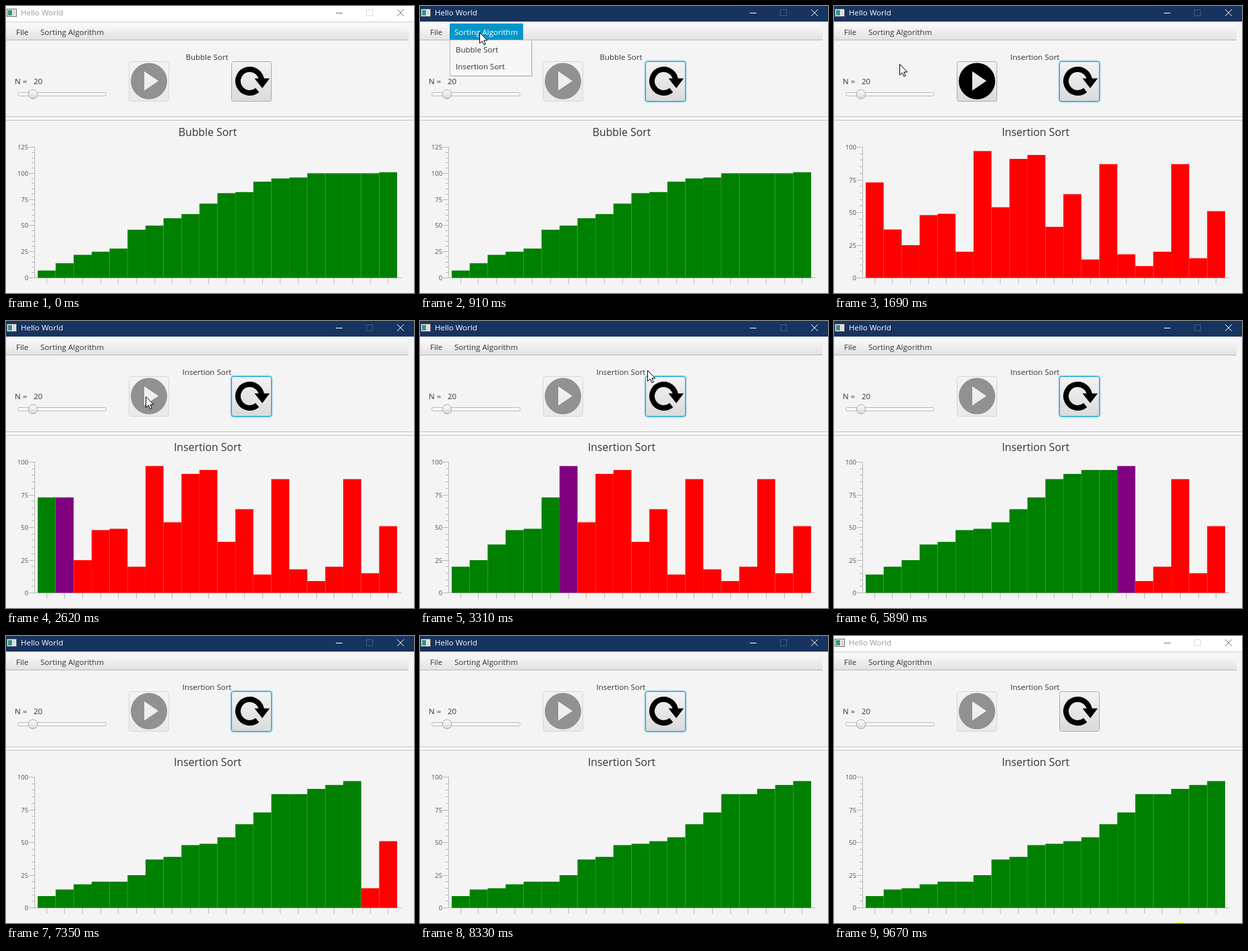
Recreate the animation shown at these times as an HTML page. Size 605 by 426 pixels, loop 9.77 s.

```html
<!DOCTYPE html>
<html lang="en">
<head>
<meta charset="utf-8">
<title>Sorting</title>
<style>
  html, body { margin: 0; width: 100%; height: 100%; overflow: hidden; background: #f4f4f4; }
  svg { display: block; }
  text { font: 11.5px "Open Sans", "Noto Sans", sans-serif; fill: #333; white-space: pre; }
  .mid { text-anchor: middle; }
  .title { font-size: 15.8px; }
  .tick { font-size: 9.4px; fill: #4c4c4c; text-anchor: end; }
  .line { stroke: #b9b9b9; shape-rendering: crispEdges; }
</style>
</head>
<body>
<svg width="605" height="426" viewBox="0 0 605 426">
  <defs>
    <linearGradient id="barFill" x2="0" y2="1">
      <stop stop-color="#fafafa"/><stop offset="1" stop-color="#e2e2e2"/>
    </linearGradient>
    <linearGradient id="btnFill" x2="0" y2="1">
      <stop stop-color="#f3f3f3"/><stop offset="1" stop-color="#dadada"/>
    </linearGradient>
    <linearGradient id="thumbFill" x2="0" y2="1">
      <stop stop-color="#fdfdfd"/><stop offset="1" stop-color="#d6d6d6"/>
    </linearGradient>
  </defs>
  <rect width="605" height="426" fill="#f4f4f4"/>

  <!-- title bar -->
  <rect id="caption" width="605" height="23"/>
  <path d="M0 23.5H605" class="line" style="stroke:#d4d4d4"/>
  <rect x="1.5" y="4.5" width="14" height="11" fill="#f4f4f4" stroke="#666"/>
  <rect x="3" y="6" width="6" height="8" fill="#3f8f83"/>
  <rect x="10" y="6" width="4" height="8" fill="#d5d9dc"/>
  <text id="name" x="22" y="14">Hello World</text>
  <g fill="none">
    <path id="minBtn" d="M489 10.5H499"/>
    <rect id="maxBtn" x="534.5" y="5.5" width="9" height="9"/>
    <path id="closeBtn" d="M580 5L590 15M590 5L580 15"/>
  </g>

  <!-- menu bar -->
  <rect y="26" width="597" height="24" fill="url(#barFill)"/>
  <path d="M0 50.5H597" class="line"/>
  <rect id="menuHot" x="44" y="26" width="109" height="24" fill="#0096c9"/>
  <text x="15" y="43">File</text>
  <text id="menuName" x="51" y="43">Sorting Algorithm</text>

  <!-- controls -->
  <text x="13" y="116">N =  </text>
  <text x="41" y="116">20</text>
  <rect x="17.5" y="128.5" width="131" height="5" rx="2.5" fill="#fafafa" stroke="#b9b9b9"/>
  <circle cx="40" cy="131" r="6.8" fill="url(#thumbFill)" stroke="#a9a9a9"/>
  <text id="label" class="mid" x="298" y="80"></text>
  <g id="play">
    <rect x="182.5" y="82.5" width="59" height="59" rx="3" fill="url(#btnFill)" stroke="#acacac"/>
    <path fill-rule="evenodd" d="M185 111.5a27 27 0 1 1 54 0a27 27 0 1 1 -54 0M205 97V125.5L226 111.3Z"/>
  </g>
  <rect id="glow" x="333.5" y="81.5" width="61" height="61" rx="4" fill="none" stroke="#039ed3" stroke-opacity=".35" stroke-width="2"/>
  <rect id="reset" x="334.5" y="82.5" width="59" height="59" rx="3" fill="url(#btnFill)"/>
  <path d="M379 111.5A17.5 17.5 0 1 0 372.7 124.9" fill="none" stroke="#000" stroke-width="8"/>
  <path d="M368.5 107.5H391L380 122Z"/>

  <!-- divider -->
  <rect y="164" width="605" height="6" fill="#fbfbfb"/>
  <path d="M0 164.5H605M0 169.5H605" class="line" style="stroke:#c2c2c2"/>

  <!-- chart -->
  <text id="title" class="mid title" x="299" y="193"></text>
  <g id="axes"></g>
  <g id="bars"></g>

  <g id="popup">
    <rect x="46" y="53" width="121" height="52" fill="#000" opacity=".12"/>
    <rect x="44.5" y="50.5" width="121" height="53" fill="#f7f7f7" stroke="#b9b9b9"/>
    <rect id="itemHot" x="45" width="120" height="25" fill="#0096c9"/>
    <text class="item" x="53" y="69">Bubble Sort</text>
    <text class="item" x="53" y="94">Insertion Sort</text>
  </g>
  <circle id="click" cx="513" cy="436.5" r="12.5" fill="#ffff28" opacity=".8"/>
  <path id="cursor" d="M.5 .5V16.5L4.2 13L6.7 18.6L9.2 17.5L6.8 12H11.8Z" fill="#fff" stroke="#000"/>
</svg>
<script>
const LOOP = 9770, N = 20, LEFT = 47, STEP = 26.65, BASE = 403.5, HEIGHT = 194;
const MENU_OPEN = 850, PICK = 1620, PLAY = 2470, BLUR = 9670;

const sorted = [7, 14, 22, 25, 28, 46, 50, 57, 61, 71, 81, 82, 92, 95, 96, 100, 100, 100, 100, 101];
const shuffled = [73, 37, 25, 48, 49, 20, 97, 54, 91, 94, 39, 64, 14, 87, 18, 9, 20, 87, 15, 51];

// start and end of each insertion pass, from the second bar on
const passes = [
  [2620, 2670], [2690, 2760], [2780, 2830], [2980, 3020], [3050, 3190],
  [3380, 3410], [3610, 3680], [3960, 4020], [4310, 4360], [4510, 4740],
  [5000, 5110], [5140, 5380], [5720, 5800], [5870, 6130], [6150, 6440],
  [6580, 6830], [7270, 7370], [7400, 7780], [8160, 8330]
];

// pointer trips: time, x, y
const trips = [
  [[110, 470, 424], [480, 250, 200], [800, 88, 40], [1070, 88, 38], [1470, 97, 86],
   [1720, 97, 86], [2400, 207, 112], [2980, 207, 112], [3300, 337, 73], [3325, 337, 73], [3410, 562, 150]],
  [[8940, 587, 134], [9200, 481, 330], [9430, 507, 432]]
];

const $ = id => document.getElementById(id);
const set = (el, attrs) => { for (const k in attrs) el.setAttribute(k, attrs[k]); };
const show = (id, on) => { $(id).style.display = on ? "" : "none"; };

function axis(id, max) {
  let lines = "", labels = "";
  for (let v = 0; v <= max; v += 5) {
    const y = BASE - v / max * HEIGHT, major = v % 25 === 0;
    lines += `M${major ? 34 : 38} ${Math.floor(y) + .5}H42`;
    if (major) labels += `<text class="tick" x="33" y="${y + 3.5}">${v}</text>`;
  }
  return `<g id="${id}"><path class="line" d="${lines}"/>${labels}</g>`;
}

let marks = "M42.5 209V404M42 403.5H586";
for (let i = 0; i < N; i++) marks += `M${Math.floor(LEFT + (i + .5) * STEP) + .5} 404V412`;
$("axes").innerHTML = `<path class="line" d="${marks}"/>` + axis("wide", 125) + axis("narrow", 100);
$("bars").innerHTML = Array.from({ length: N }, (_, i) =>
  `<rect x="${LEFT + i * STEP}" width="${STEP}"/>`).join("");
const bars = [...$("bars").children], items = [...document.querySelectorAll(".item")];

// values, count of finished bars and whether the next one is being inserted
function insertion(t) {
  const a = shuffled.slice();
  if (t < PLAY) return { a, done: 0, live: false };
  let i = 1, live = true;
  for (; i < N; i++) {
    const [start, end] = passes[i - 1];
    if (t < start) break;
    const key = a[i], moves = a.slice(0, i).filter(v => v > key).length;
    const k = Math.floor((t - start) / (end - start) * (moves + 1) + 1e-6);
    for (let m = 0; m < Math.min(moves, k + 1); m++) a[i - m] = a[i - m - 1];
    if (k < moves) break;
    a[i - moves] = key;
    if (k === moves) { live = false; i++; break; }
  }
  return { a, done: i, live };
}

function pointer(t) {
  const trip = trips.find(p => t >= p[0][0] && t < p[p.length - 1][0]);
  if (!trip) return null;
  const n = trip.findIndex(p => p[0] > t), [t0, x0, y0] = trip[n - 1], [t1, x1, y1] = trip[n];
  const u = (t - t0) / (t1 - t0), e = u * u * (3 - 2 * u);
  return { x: Math.round(x0 + (x1 - x0) * e), y: Math.round(y0 + (y1 - y0) * e) };
}

function draw(t) {
  const active = t >= MENU_OPEN && t < BLUR, picked = t >= PICK;
  const menu = t >= MENU_OPEN && !picked, at = pointer(t);

  set($("caption"), { fill: active ? "#17335f" : "#fff" });
  $("name").style.fill = active ? "#fff" : "#999";
  for (const id of ["minBtn", "closeBtn"]) set($(id), { stroke: active ? "#fff" : "#777" });
  set($("maxBtn"), { stroke: active ? "#45597b" : "#dcdcdc" });
  set($("reset"), { stroke: active ? "#039ed3" : "#acacac" });
  show("glow", active);

  show("popup", menu);
  show("menuHot", menu);
  $("menuName").style.fill = menu ? "#fff" : "";
  const hot = menu && at && at.y > 50 ? (at.y < 78 ? 0 : 1) : -1;
  show("itemHot", hot >= 0);
  set($("itemHot"), { y: 53 + 25 * Math.max(hot, 0) });
  items.forEach((el, i) => { el.style.fill = i === hot ? "#fff" : ""; });

  const name = picked ? "Insertion Sort" : "Bubble Sort";
  $("label").textContent = $("title").textContent = name;
  set($("play"), { opacity: picked && t < PLAY ? 1 : .4 });
  show("wide", !picked);
  show("narrow", picked);

  const { a, done, live } = picked ? insertion(t) : { a: sorted, done: N, live: false };
  const unit = HEIGHT / (picked ? 100 : 125);
  bars.forEach((bar, i) => set(bar, {
    y: BASE - a[i] * unit,
    height: a[i] * unit,
    fill: i < done ? "#008000" : i === done && live ? "#800080" : "#f00"
  }));

  show("cursor", at);
  if (at) set($("cursor"), { transform: `translate(${at.x} ${at.y})` });
  show("click", t >= 9430);
}

const begin = performance.now();
function tick() {
  draw((performance.now() - begin) % LOOP);
  requestAnimationFrame(tick);
}
tick();
</script>
</body>
</html>
```
